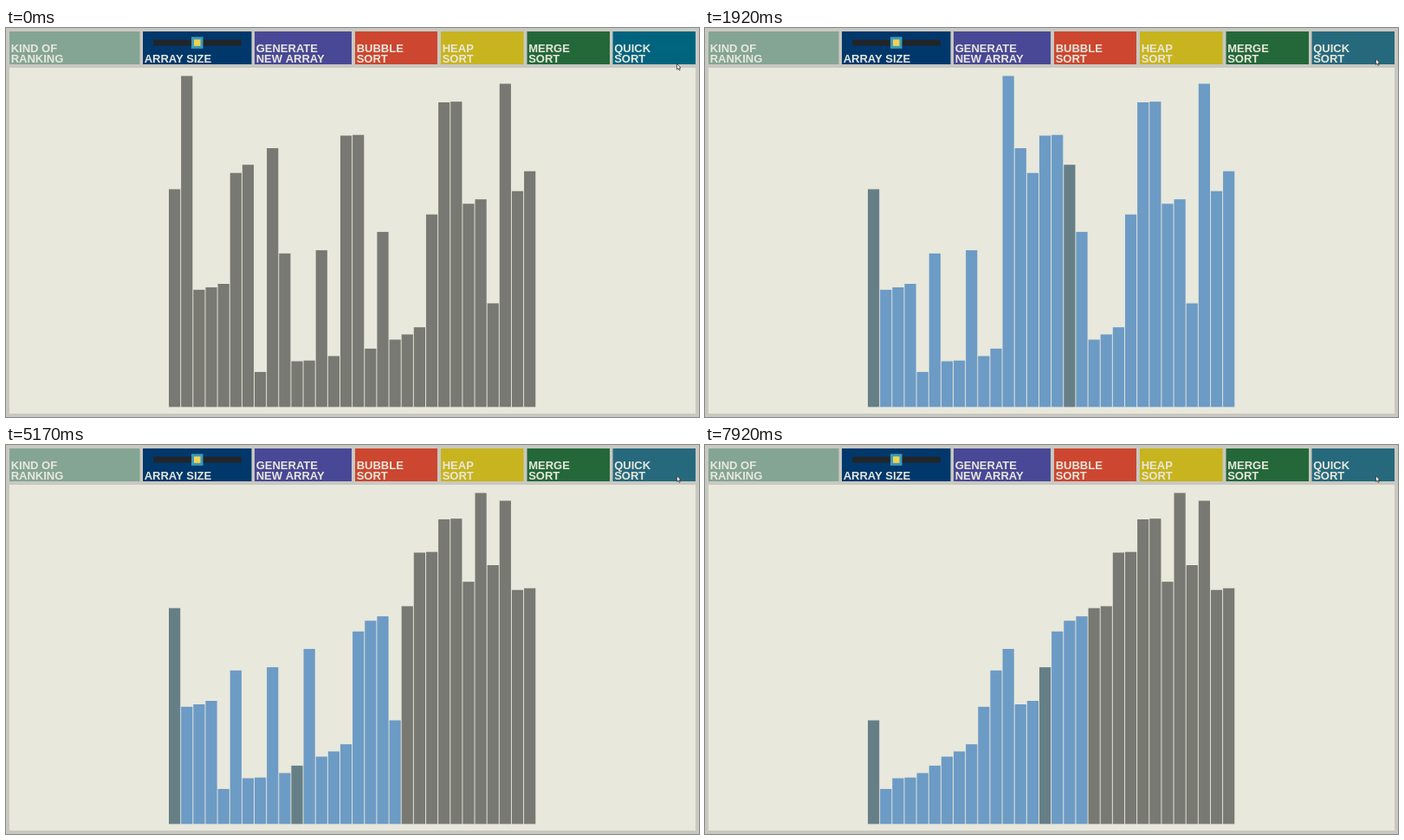
Animation of 800 by 450 pixels, one loop 8000 ms. Source, as an HTML page with a canvas:

```html
<!DOCTYPE html>
<html lang="en">
<head>
<meta charset="utf-8">
<title>Quick sort</title>
<style>
  html, body { margin: 0; width: 100%; height: 100%; overflow: hidden; }
  canvas { display: block; }
</style>
</head>
<body>
<canvas id="stage" width="800" height="450"></canvas>
<script>
const ctx = document.getElementById('stage').getContext('2d');

const LOOP = 8000, FPS = 12, FRAMES = 96;
const FLOOR = 438.4, LEFT = 188, PITCH = 14.14, BAR = 13.2;
const CREAM = '#e8e8dc', GRAY = '#797973', BLUE = '#6c9bc5', MARK = '#667f87';

// Top edge of every bar; a smaller number is a taller bar
const tops = [187, 56, 303.3, 300.5, 296.5, 168.2, 158.7, 398.4, 139.5, 261.3,
  386, 385.2, 257.6, 380, 125, 124.2, 371.4, 236.4, 361, 355,
  346.7, 216.2, 86.5, 85.7, 203.8, 198.7, 319, 65, 189.2, 166.2];

const buttons = [
  { x: 4, w: 150.5, color: '#84a494', lines: ['KIND OF', 'RANKING'] },
  { x: 158, w: 125.5, color: '#00386c', lines: ['', 'ARRAY SIZE'] },
  { x: 287, w: 112, color: '#484896', lines: ['GENERATE', 'NEW ARRAY'] },
  { x: 403, w: 95, color: '#cc4630', lines: ['BUBBLE', 'SORT'] },
  { x: 502, w: 95.5, color: '#c8b41e', lines: ['HEAP', 'SORT'] },
  { x: 601.5, w: 95.5, color: '#24683a', lines: ['MERGE', 'SORT'] },
  { x: 700.5, w: 95.5, color: '#00647f', hover: '#26697d', lines: ['QUICK', 'SORT'] }
];

// Quick sort with the first bar as pivot; each swap is one step
function* quickSort(a, lo, hi) {
  if (lo >= hi) return;
  const swap = (p, q) => { [a[p], a[q]] = [a[q], a[p]]; };
  const step = (mark, hold) => ({ bars: [...a], lo, hi, mark, hold });
  let i = lo;
  for (let j = lo + 1; j <= hi; j++) {
    if (a[j] > a[lo]) {
      swap(++i, j);
      yield step(j, 2);
    }
  }
  swap(lo, i);
  yield step(i, 1);
  yield* quickSort(a, lo, i - 1);
  yield* quickSort(a, i + 1, hi);
}

const idle = { bars: tops, lo: 0, hi: -1 };
const timeline = [idle, idle, idle, idle];
for (const s of quickSort([...tops], 0, tops.length - 1)) {
  for (let n = 0; n < s.hold; n++) timeline.push(s);
  if (timeline.length >= FRAMES) break;
}

function rect(color, x, y, w, h) {
  ctx.fillStyle = color;
  ctx.fillRect(x, y, w, h);
}

function drawButton(b, hovered) {
  rect(hovered && b.hover || b.color, b.x, 4, b.w, 38);
  ctx.fillStyle = CREAM;
  b.lines.forEach((line, i) => ctx.fillText(line, b.x + 1.7, 28.4 + i * 11.5));
}

function drawSlider() {
  ctx.fillStyle = '#222528';
  ctx.beginPath();
  ctx.roundRect(170, 13.5, 102, 7, 1.5);
  ctx.fill();
  rect('#3c9ab8', 214, 10.3, 13.5, 13.5);
  rect('#f0d254', 217, 13.3, 7.5, 7.5);
}

function drawCursor(x, y) {
  ctx.beginPath();
  [[0, 0], [0, 6.5], [1.6, 5.2], [2.7, 7.6], [3.8, 7], [2.8, 4.8], [4.6, 4.6]]
    .forEach(([dx, dy]) => ctx.lineTo(x + dx, y + dy));
  ctx.closePath();
  ctx.fillStyle = '#fff';
  ctx.fill();
  ctx.strokeStyle = '#333';
  ctx.lineWidth = 0.8;
  ctx.stroke();
}

function drawBars({ bars, lo, hi, mark }) {
  bars.forEach((top, i) => {
    const active = i >= lo && i <= hi;
    const marked = active && (i === lo || i === mark);
    rect(marked ? MARK : active ? BLUE : GRAY, LEFT + i * PITCH, top - 0.5, BAR, FLOOR - top + 0.5);
  });
}

function draw(now) {
  const t = now % LOOP;
  const k = Math.min(FRAMES - 1, Math.floor((t + 4) * FPS / 1000));
  const hovered = k > 0;
  rect('#c8c8c1', 0, 0, 800, 450);
  rect(CREAM, 4, 46, 792, 400);
  ctx.font = 'bold 13px "Liberation Sans", Arial, sans-serif';
  buttons.forEach(b => drawButton(b, hovered));
  drawSlider();
  drawBars(timeline[k]);
  drawCursor(774.4, hovered ? 35.8 : 41.4);
}

const start = performance.now();
function tick() {
  draw(performance.now() - start);
  requestAnimationFrame(tick);
}
tick();
</script>
</body>
</html>
```
